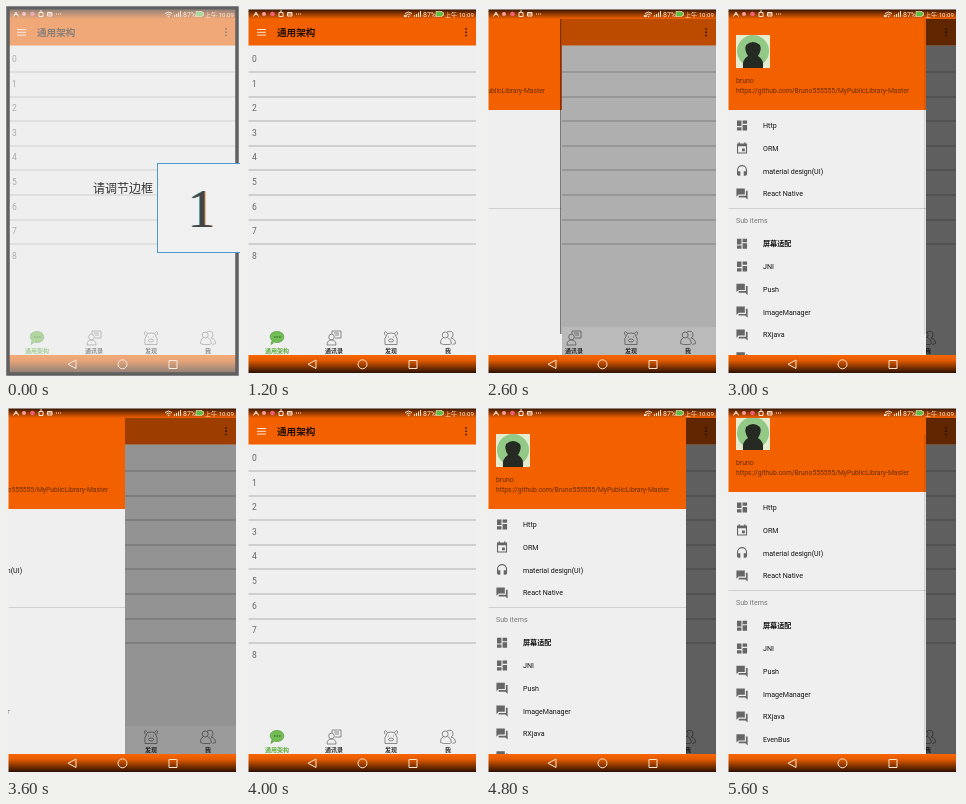
Recreate the animation shown at these times as an HTML page. Size 234 px wide and 371 px high, loop 5800 ms.

```html
<!DOCTYPE html>
<html lang="zh">
<head>
<meta charset="utf-8">
<style>
  html, body { margin: 0; width: 100%; height: 100%; overflow: hidden; background: #f0f0f0; }
  svg { display: block; width: 234px; height: 371px; font-family: Roboto, "Noto Sans CJK SC", "Noto Sans CJK", sans-serif; }
  text { white-space: pre; }
  .line { fill: none; stroke: #707070; stroke-width: .8; stroke-linejoin: round; }
  .sys { fill: none; stroke: #ffe3cf; stroke-width: 1; }
  .one { font: 54px "Liberation Serif", serif; text-shadow: -1px 0 #5aa3ad, 1px 0 #d0904f; }
</style>
</head>
<body>
<svg viewBox="0 0 234 371">
  <defs>
    <linearGradient id="statusFill" x2="0" y2="1">
      <stop stop-color="#2a1000"/><stop offset=".45" stop-color="#8a3600"/><stop offset="1" stop-color="#f06000"/>
    </linearGradient>
    <linearGradient id="barFill" x2="0" y2="1">
      <stop stop-color="#fa6600"/><stop offset=".3" stop-color="#e25a00"/><stop offset="1" stop-color="#2c1000"/>
    </linearGradient>
    <clipPath id="content"><path d="M2 13H230V349H2Z"/></clipPath>
    <clipPath id="panel"><path d="M2 13H200V349H2Z"/></clipPath>
  </defs>

  <rect width="234" height="371" fill="#f0f0f0"/>
  <g id="main">
    <rect x="2" y="13" width="228" height="336" fill="#efefef"/>
    <rect x="2" y="13" width="228" height="26.5" fill="#f26000"/>
    <path d="M11 23.5h9M11 26.3h9M11 29.1h9" stroke="#ffe3cf"/>
    <path d="M220 22.2v1.500M220 25.500v1.500M220 28.800v1.500" stroke="#301400" stroke-width="1.600"/>
    <g id="rows"></g>
    <g id="tabs"></g>
  </g>

  <g clip-path="url(#content)">
    <path id="barScrim" d="M2 13H230V39.500H2ZM2 321H230V349H2Z"/>
    <path id="listScrim" d="M2 39.500H230V321H2Z"/>
    <g id="drawer">
      <rect x="2" y="13" width="198" height="336" fill="#efefef"/>
      <g clip-path="url(#panel)">
        <g id="menu"></g>
        <rect id="thumb" x="198" width="1.500" height="315"/>
      </g>
    </g>
  </g>

  <g id="status">
    <rect x="2" y="3" width="228" height="10" fill="url(#statusFill)"/>
    <path d="M7.500 10.500l2.500-4.500 2.500 4.500M8 8.500h4" class="sys" stroke-width=".8"/>
    <circle cx="18" cy="8" r="2" fill="#ff9c9c"/>
    <circle cx="26.5" cy="8" r="2.3" fill="#f2607a"/>
    <path d="M33 6.5h4v4h-4zM34 5h2M41.5 6.500h4.500v3.500h-4.500zM41.500 8h4.500M50 8h1M52 8h1M54 8h1" class="sys"/>
    <path d="M159 7.500q3.500-3 7 0M160.500 9q2-2 4 0" class="sys"/>
    <circle cx="162.500" cy="10.500" r=".8" fill="#ffe3cf"/>
    <path d="M168.500 11v-2M170.500 11v-3M172.500 11v-4.500M174.500 11v-6" class="sys"/>
    <rect id="activity" x="158" y="9" width="2.500" height="2" fill="#ffe3cf"/>
    <path d="M190 5.500h6v1h1.500v3h-1.500v1h-6z" fill="#5fbf45" stroke="#ffe3cf" stroke-width=".6"/>
  </g>
  <g>
    <rect x="2" y="349" width="228" height="18" fill="url(#barFill)"/>
    <path d="M70 354v8.500l-8-4.250zM163 354.500h8v8h-8z" class="sys"/>
    <circle cx="116.500" cy="358.300" r="4.500" class="sys"/>
  </g>
  <path d="M0 0H234V371H0ZM2.500 3.500V367H230V3.500Z" fill="#f0f0f0" fill-rule="evenodd"/>

  <g id="prompt">
    <rect width="232" height="369" fill="#f0f0f0" opacity=".5"/>
    <path d="M2 2H231V368H2Z" fill="none" stroke="#606060" stroke-width="3.500"/>
    <rect x="151.500" y="157.500" width="90" height="89" fill="#f0f0f0" stroke="#4b9ad2"/>
    <text x="195.500" y="221" text-anchor="middle" fill="#444" class="one">1</text>
  </g>
</svg>

<script>
const $ = id => document.getElementById(id);
const add = (id, markup) => $(id).insertAdjacentHTML('beforeend', markup);
const label = (x, middle, size, text, fill = '#222', attrs = '') =>
  `<text x="${x}" y="${middle + size * .35}" font-size="${size}" fill="${fill}" ${attrs}>${text}</text>`;
const bold = 'font-weight="700"';

// Main screen
add('main', label(31, 26.3, 9.6, '通用架构', '#241000', bold));
for (let i = 0; i < 9; i++) {
  const y = 53 + i * 24.6;
  add('rows', label(6, y, 8.5, i, '#666'));
  if (i < 8) add('rows', `<rect x="2" y="${Math.round(y + 12)}" width="228" height="2" fill="#cfcfcf"/>`);
}

const tabs = [
  ['通用架构', '<path d="M0-6.500c9 0 9 11 0 11q-1.500 0-2.500-.5l-3.500 2.500 1-4c-4-4-1-9 5-9z" fill="#72bd55" stroke="#559d3c" stroke-width=".7"/><path d="M-3-1h1.500M-.5-1h1.500M2-1h1.500" stroke="#3c7d2a" stroke-width="1.400"/>'],
  ['通讯录', '<path d="M-2-4v-3h9v7h-6M0-5h5M1-3h4"/><circle cx="-2.500" cy="-1" r="2.800"/><path d="M-7 7q0-5 4.500-5t4.500 5z"/>'],
  ['发现', '<path d="M-3.500-4.500q-2.500-3.500-3-.5 0 1.500 1 2.500M3.500-4.500q2.500-3.500 3-.5 0 1.500-1 2.500M-3.500-4.500q3.500-1 7 0 4 5 2.500 11h-12q-1.500-6 2.500-11z"/><ellipse cy="2.500" rx="2.500" ry="1.500"/><path d="M-3-1h1M2-1h1"/>'],
  ['我', '<circle cx="-2.800" cy="-3" r="3"/><path d="M-1-6q6-2.500 6 3 0 2.500-2 3 4.500 1 4.500 5.500l-3 1M-4.500-.5q-3.500 1.500-3 6l3 1h6l2-1q0-4.500-4-6"/>']
];
tabs.forEach(([name, icon], i) => {
  const x = 31 + i * 57;
  add('tabs', `<g class="line" transform="translate(${x} 332)">${icon}</g>` +
    label(x, 344.7, 6, name, i ? '#333' : '#5eae3d', 'text-anchor="middle" ' + bold));
});

// Drawer
const icons = {
  grid: 'M3 13h8V3H3zm0 8h8v-6H3zm10 0h8V11h-8zm0-18v6h8V3z',
  date: 'M17 12h-5v5h5zM16 1v2H8V1H6v2H3v18h18V3h-3V1zm3 18H5V8h14z',
  sound: 'M12 1a9 9 0 0 0-9 9v7a3 3 0 0 0 3 3h3v-8H5v-2a7 7 0 0 1 14 0v2h-4v8h3a3 3 0 0 0 3-3v-7a9 9 0 0 0-9-9z',
  chat: 'M21 6h-2v9H6v3h12l4 4V6zM17 13V2H2v15l4-4z'
};
const items = [
  [119.5, 'grid', 'Http'], [142.5, 'date', 'ORM'], [165.2, 'sound', 'material design(UI)'], [188, 'chat', 'React Native'],
  [237.8, 'grid', '屏幕适配'], [260.5, 'grid', 'JNI'], [283.3, 'chat', 'Push'], [306.2, 'chat', 'ImageManager'],
  [329, 'chat', 'RXjava'], [351.8, 'chat', 'EvenBus']
];
add('menu', `
  <rect x="2" y="-20" width="198" height="124" fill="#f26000"/>
  <rect x="10" y="29" width="34" height="33" fill="#e6ecd0"/>
  <circle cx="27" cy="45" r="16" fill="#93c987"/>
  <path d="M17 62q-1-9 5-12-4-6-2-11 7-6 14 0 2 5-2 11 6 3 5 12z" fill="#252b22"/>
  <rect x="2" y="202" width="198" height="1" fill="#cfcfcf"/>` +
  label(10, 75, 6.9, 'bruno', '#6b2c00') +
  label(10, 84.5, 6.75, 'https://github.com/Bruno555555/MyPublicLibrary-Master', '#6b2c00') +
  label(10, 214.5, 7.1, 'Sub items', '#777') +
  items.map(([y, icon, name]) =>
    `<path d="${icons[icon]}" fill="#666" transform="translate(9.300 ${y - 6.7}) scale(.56)"/>` +
    label(37, y, 7.1, name, '#111', /\w/.test(name) ? '' : bold)).join(''));

add('status', label(177, 8.5, 7, '87%', '#ffe3cf') + label(199, 8.5, 6.1, '上午 10:09', '#ffe3cf'));
add('prompt', label(87, 183, 12, '请调节边框', '#333'));

// Each step: start time, then a value held until the next step
const edges = [[0, 2], [2400, 18], [2600, 76], [2800, 150], [3000, 200], [3600, 119], [3800, 30], [4000, 2], [4400, 166], [4600, 200]];
const scrolls = [[0, 0], [5200, 10], [5400, 17]];
const thumbs = [[0, 0], [2600, .5], [3000, .1], [3400, 0], [4400, .5], [4600, .1], [4800, 0], [5200, .3], [5600, .12]];
const signals = [[0, 0], [1200, 1], [1800, 0], [2200, 1], [3200, 0], [4800, 1]];
const at = (steps, time) => steps.findLast(([start]) => start <= time)[1];

function draw(now) {
  const time = now % 5800, edge = at(edges, time), scroll = at(scrolls, time);
  const open = (edge - 2) / 198, dim = open < .17 ? 0 : open;
  $('prompt').style.display = time < 200 ? '' : 'none';
  $('drawer').style.display = open ? '' : 'none';
  $('drawer').setAttribute('transform', `translate(${edge - 200})`);
  $('menu').setAttribute('transform', `translate(0 ${-scroll})`);
  $('thumb').setAttribute('y', 13 + scroll);
  $('thumb').setAttribute('opacity', at(thumbs, time));
  $('barScrim').setAttribute('opacity', .6 * dim);
  $('listScrim').setAttribute('opacity', .2 * Math.sqrt(dim) + .4 * dim);
  $('activity').setAttribute('opacity', at(signals, time));
  requestAnimationFrame(draw);
}
draw(0);
</script>
</body>
</html>
```
